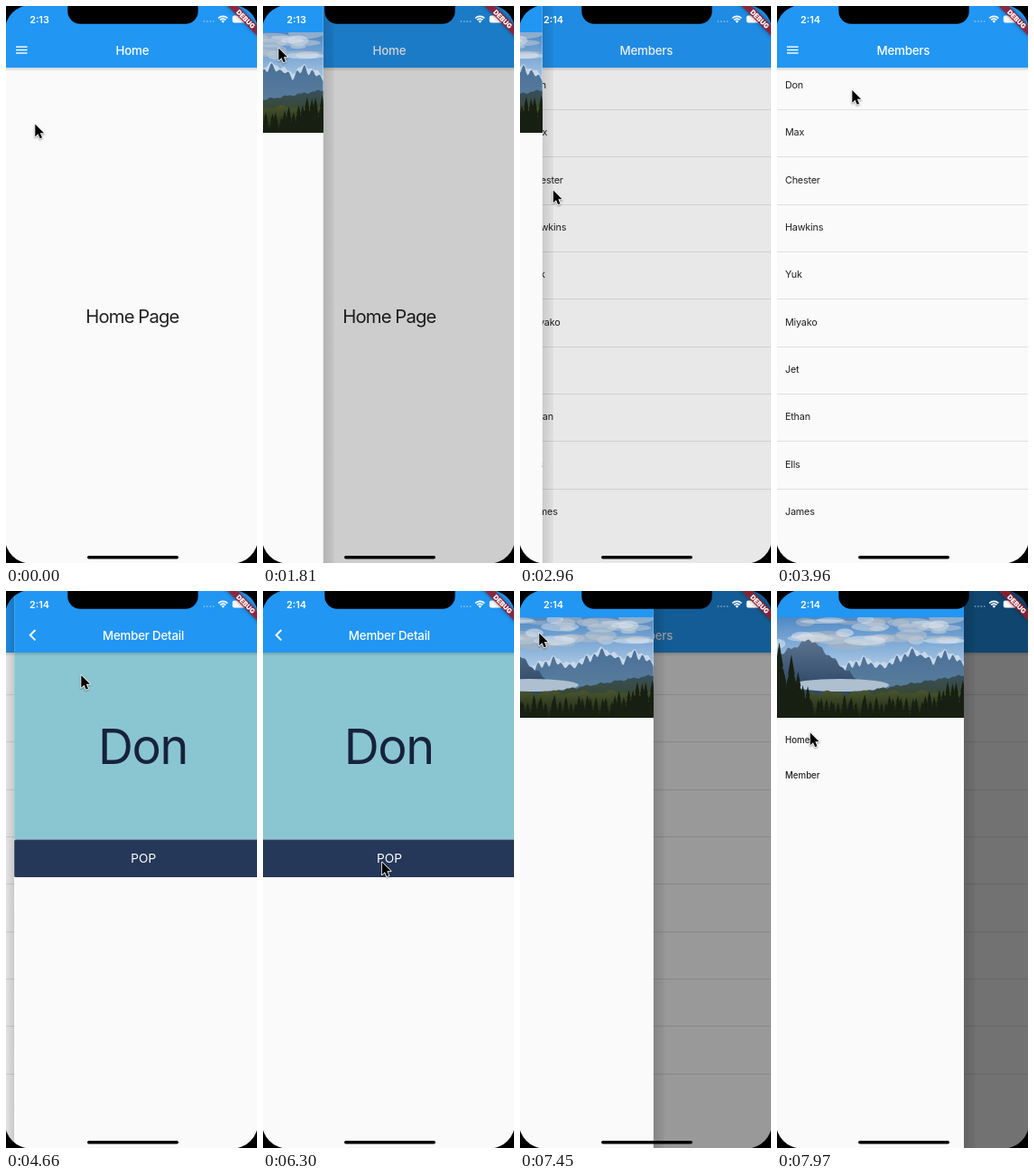
An HTML page with a canvas that plays this animation: 278x615 px, repeating every 8 s.

```html
<!DOCTYPE html>
<html lang="en">
<head>
<meta charset="utf-8">
<title>Drawer navigation</title>
<style>
  html, body { margin: 0; width: 100%; height: 100%; overflow: hidden; background: #000; }
  canvas { display: block; width: 278px; height: 615px; }
</style>
</head>
<body>
<canvas id="stage"></canvas>
<script>
const W = 278, H = 615, LOOP = 8000;
const LEFT = -3, PAGE_W = 284, DRAWER_W = 210, BAR_H = 68;
const ROW = 52.35, PHOTO_TOP = 29, PHOTO_END = 140;
const BLUE = '#2196f3', PAPER = '#fafafa', INK = '#212121';
const FONT = 'Inter, Roboto, sans-serif';
const NAMES = ['Don', 'Max', 'Chester', 'Hawkins', 'Yuk', 'Miyako', 'Jet', 'Ethan', 'Ells', 'James'];

const canvas = document.getElementById('stage');
const ctx = canvas.getContext('2d');
const dpr = window.devicePixelRatio || 1;
canvas.width = W * dpr;
canvas.height = H * dpr;

const clamp = v => Math.max(0, Math.min(1, v));
const easeInOut = t => t * t * (3 - 2 * t);
const black = a => `rgba(0,0,0,${a})`;

function seeded(seed) {
  return () => (seed = seed * 16807 % 2147483647) / 2147483647;
}

// Critically damped spring, stiffness 500, initial velocity 1
function spring(ms) {
  if (ms <= 0) return 0;
  const t = ms / 1000, w = Math.sqrt(500);
  return clamp(1 - Math.exp(-w * t) * (1 + (w - 1) * t));
}

// Cubic bezier (0.35, 0.91, 0.33, 0.97)
function slideCurve(t) {
  if (t <= 0) return 0;
  if (t >= 1) return 1;
  const bez = (a, b, s) => 3 * a * s * (1 - s) ** 2 + 3 * b * s * s * (1 - s) + s ** 3;
  let lo = 0, hi = 1;
  for (let i = 0; i < 24; i++) {
    const mid = (lo + hi) / 2;
    if (bez(0.35, 0.33, mid) < t) lo = mid; else hi = mid;
  }
  return bez(0.91, 0.97, lo);
}

function pointerAt(t) {
  let x = 32, y = 130;
  const move = (from, to, tx, ty) => {
    const k = easeInOut(clamp((t - from) / (to - from)));
    x += (tx - x) * k;
    y += (ty - y) * k;
  };
  move(1110, 1530, 17, 46);
  move(2080, 2550, 36.5, 203);
  move(3540, 3960, 83, 92.5);
  move(4980, 5580, 131.5, 299);
  move(6640, 7080, 21, 46);
  move(7580, 7970, 36.5, 156);
  return [x, y];
}

function drawerAt(t) {
  if (t < 2850) return spring(t - 1760);
  if (t < 3140) return 1 - spring(t - 2805);
  return spring(t - 7340);
}

function detailAt(t) {
  return t < 6000 ? slideCurve((t - 4420) / 400) : 1 - slideCurve((t - 6310) / 400);
}

function rect(x, y, w, h, fill) {
  ctx.fillStyle = fill;
  ctx.fillRect(x, y, w, h);
}

function pill(x, y, w, h, r, fill) {
  ctx.beginPath();
  ctx.roundRect(x, y, w, h, r);
  ctx.fillStyle = fill;
  ctx.fill();
}

function oval(x, y, rx, ry, fill) {
  ctx.beginPath();
  ctx.ellipse(x, y, rx, ry, 0, 0, Math.PI * 2);
  ctx.fillStyle = fill;
  ctx.fill();
}

// Colours spread evenly between two points
function gradient(x0, y0, x1, y1, ...colors) {
  const g = ctx.createLinearGradient(x0, y0, x1, y1);
  colors.forEach((c, i) => g.addColorStop(i / (colors.length - 1), c));
  return g;
}

function text(str, x, y, size, weight, fill, spacing = 0, align = 'left') {
  ctx.font = `${weight} ${size}px ${FONT}`;
  ctx.letterSpacing = spacing + 'px';
  ctx.textAlign = align;
  ctx.fillStyle = fill;
  ctx.fillText(str, x + (align === 'center' ? spacing / 2 : 0), y);
}

function appBar(title) {
  rect(LEFT, BAR_H, PAGE_W, 4, gradient(0, BAR_H, 0, BAR_H + 4, black(0.16), black(0)));
  rect(LEFT, 0, PAGE_W, BAR_H, BLUE);
  text(title, 140, 53.5, 13.3, 500, '#fff', -0.2, 'center');
}

function menuIcon() {
  for (let i = 0; i < 3; i++) rect(11, 44.4 + i * 3.45, 12.6, 1.4, '#fff');
}

function homePage() {
  rect(LEFT, 0, PAGE_W, H, PAPER);
  text('Home Page', 140.3, 349.5, 20.3, 400, INK, -0.9, 'center');
  appBar('Home');
  menuIcon();
}

function membersPage() {
  rect(LEFT, 0, PAGE_W, H, PAPER);
  NAMES.forEach((name, i) => {
    text(name, 9, 91 + i * ROW, 10.8, 400, INK, -0.2);
    if (i < NAMES.length - 1) rect(LEFT, Math.round(114 + i * ROW), PAGE_W, 1, '#e0e0e0');
  });
  appBar('Members');
  menuIcon();
}

function detailPage() {
  rect(LEFT, 0, PAGE_W, H, PAPER);
  rect(LEFT, BAR_H, PAGE_W, 206.5, '#8ac6d1');
  text('Don', 140, 191, 54, 400, '#17223b', -1.5, 'center');
  pill(LEFT, 274.5, PAGE_W, 41.5, 1.5, '#263859');
  text('POP', 140, 300, 13.7, 400, '#fff', 0, 'center');
  appBar('Member Detail');
  ctx.beginPath();
  ctx.moveTo(20.3, 43);
  ctx.lineTo(14.6, 48.7);
  ctx.lineTo(20.3, 54.4);
  ctx.strokeStyle = '#fff';
  ctx.lineWidth = 2;
  ctx.stroke();
}

function shifted(dx, draw) {
  ctx.save();
  ctx.translate(dx, 0);
  draw();
  ctx.restore();
}

// Fills everything below the height line f(x)
function ridge(fill, f) {
  ctx.beginPath();
  ctx.moveTo(LEFT, PHOTO_END);
  for (let x = LEFT; x <= LEFT + DRAWER_W; x += 1.5) ctx.lineTo(x, f(x));
  ctx.lineTo(LEFT + DRAWER_W, PHOTO_END);
  ctx.fillStyle = fill;
  ctx.fill();
}

function spruce(x, top) {
  const h = PHOTO_END - top, tiers = 5;
  ctx.fillStyle = '#172012';
  for (let i = 1; i <= tiers; i++) {
    const half = h * 0.2 * i / tiers + 1;
    ctx.beginPath();
    ctx.moveTo(x, top + h * (i - 1) / (tiers + 1));
    ctx.lineTo(x + half, top + h * (i + 0.6) / tiers);
    ctx.lineTo(x - half, top + h * (i + 0.6) / tiers);
    ctx.fill();
  }
}

function landscape() {
  const rand = seeded(41);
  const rough = x => 1.6 * Math.sin(x * 0.37) + 1.1 * Math.sin(x * 0.83 + 1);
  const peak = (x, at, h, slope) => h - slope * Math.abs(x - at);
  const range = x => 86 + rough(x) - Math.max(peak(x, 96, 13, 0.4), peak(x, 151, 23, 0.5), peak(x, 187, 21, 0.6));
  const mount = x => 104 + rough(x) - peak(x, 37, 51, x < 37 ? 0.5 : 0.87);

  ctx.save();
  ctx.beginPath();
  ctx.rect(LEFT, PHOTO_TOP, DRAWER_W, PHOTO_END - PHOTO_TOP);
  ctx.clip();
  rect(LEFT, PHOTO_TOP, DRAWER_W, 60, gradient(0, PHOTO_TOP, 0, 89, '#4f88c4', '#b4cfe8'));
  for (let i = 0; i < 40; i++) {
    const shade = 175 + rand() * 60;
    const x = rand() * 200, y = 30 + rand() * 30;
    oval(x, y, 8 + rand() * 18, 2 + rand() * 4, `rgba(${shade},${shade + 6},${shade + 12},.5)`);
  }

  ridge('#c9d8e8', range);
  ridge(gradient(0, 65, 0, 112, '#4a7099', '#5b7f9c'), x => range(x) + 4 + 3 * Math.sin(x * 0.7));
  ridge(gradient(0, 52, 0, 105, '#5d7490', '#2f4a68'), mount);
  oval(70, 104, 54, 7, '#aebfd0');
  ridge(gradient(0, 92, 0, 116, '#36505f', '#3a472f'), x => 110 - 0.16 * (x - 100) + rough(x) / 2);
  ridge(gradient(0, 108, 0, 136, '#4d5830', '#1f2a17'), x => 112 + rough(x / 2));

  for (let x = LEFT; x < LEFT + DRAWER_W; x += 5) {
    const tall = 66 * Math.exp(-((x / 24) ** 2)) + 26 * Math.exp(-(((207 - x) / 32) ** 2));
    spruce(x + rand() * 4, 124 - rand() * 10 - tall * (0.5 + rand() * 0.45));
  }
  ctx.restore();
}

function drawer(p) {
  if (p < 0.002) return;
  rect(0, 0, W, H, black(0.54 * p));
  const edge = LEFT + DRAWER_W * p;
  rect(edge, 0, 12, H, gradient(edge, 0, edge + 12, 0, black(0.13), black(0.04)));
  shifted(DRAWER_W * (p - 1), () => {
    rect(LEFT, 0, DRAWER_W, H, PAPER);
    rect(LEFT, 0, DRAWER_W, 29.3, BLUE);
    landscape();
    text('Home', 9, 168.3, 9.7, 500, INK);
    text('Member', 9, 207, 9.7, 500, INK);
  });
}

function debugBanner() {
  ctx.save();
  ctx.translate(282, -2);
  ctx.rotate(Math.PI / 4);
  ctx.shadowColor = black(0.5);
  ctx.shadowBlur = 4 * dpr;
  rect(-40, 19.2, 80, 8.2, 'rgba(160,28,44,.8)');
  ctx.shadowColor = 'transparent';
  text('DEBUG', 0, 26, 7.5, 900, '#fff', 0, 'center');
  ctx.restore();
}

function statusBar(clock) {
  text(clock, 37, 18.6, 10.8, 600, '#fff', 0, 'center');
  for (let i = 0; i < 4; i++) oval(219.5 + i * 3.4, 17, 0.9, 0.9, 'rgba(255,255,255,.4)');

  // Wi-Fi: a filled wedge and two arcs
  const fan = r => ctx.arc(240.3, 18.6, r, -Math.PI * 0.75, -Math.PI * 0.25);
  ctx.strokeStyle = '#fff';
  ctx.lineWidth = 1.7;
  for (const r of [7.2, 4.5]) {
    ctx.beginPath();
    fan(r);
    ctx.stroke();
  }
  ctx.beginPath();
  ctx.moveTo(240.3, 18.8);
  fan(2.6);
  ctx.fillStyle = '#fff';
  ctx.fill();

  pill(250.8, 10.6, 15.4, 7.8, 2.2, '#fff');
}

function deviceFrame() {
  ctx.fillStyle = '#000';
  ctx.beginPath();
  ctx.rect(-10, -10, W + 20, H + 20);
  ctx.roundRect(-1, -1, W + 2, H + 1.5, 28);
  ctx.fill('evenodd');
  pill(68.3, -20, 144.4, 39.8, 14, '#000');
  pill(90, 607, 101, 3.4, 1.7, '#000');
}

function pointer(x, y) {
  ctx.save();
  ctx.translate(x + 0.3, y + 0.5);
  ctx.scale(0.94, 0.94);
  const arrow = new Path2D('M0 0V14.6L3.4 11.5L5.7 16.8L8.2 15.7L5.9 10.5H10.4Z');
  ctx.shadowColor = black(0.4);
  ctx.shadowBlur = 2 * dpr;
  ctx.shadowOffsetY = dpr;
  ctx.strokeStyle = '#fff';
  ctx.lineWidth = 1.8;
  ctx.lineJoin = 'round';
  ctx.stroke(arrow);
  ctx.shadowColor = 'transparent';
  ctx.fillStyle = '#000';
  ctx.fill(arrow);
  ctx.restore();
}

function render(t) {
  ctx.setTransform(dpr, 0, 0, dpr, 0, 0);
  const onMembers = t >= 2850;
  const detail = detailAt(t);

  if (onMembers) {
    shifted(-PAGE_W / 3 * detail, membersPage);
    if (detail > 0) {
      const dx = PAGE_W * (1 - detail), edge = LEFT + dx;
      rect(edge - 28, 0, 28, H, gradient(edge - 28, 0, edge, 0, black(0), black(0.04), black(0.2)));
      shifted(dx, detailPage);
    }
  } else {
    homePage();
  }
  drawer(drawerAt(t));
  statusBar(onMembers ? '2:14' : '2:13');
  debugBanner();
  deviceFrame();
  pointer(...pointerAt(t));
}

const start = performance.now();
function tick() {
  render((performance.now() - start) % LOOP);
  requestAnimationFrame(tick);
}
tick();
</script>
</body>
</html>
```
